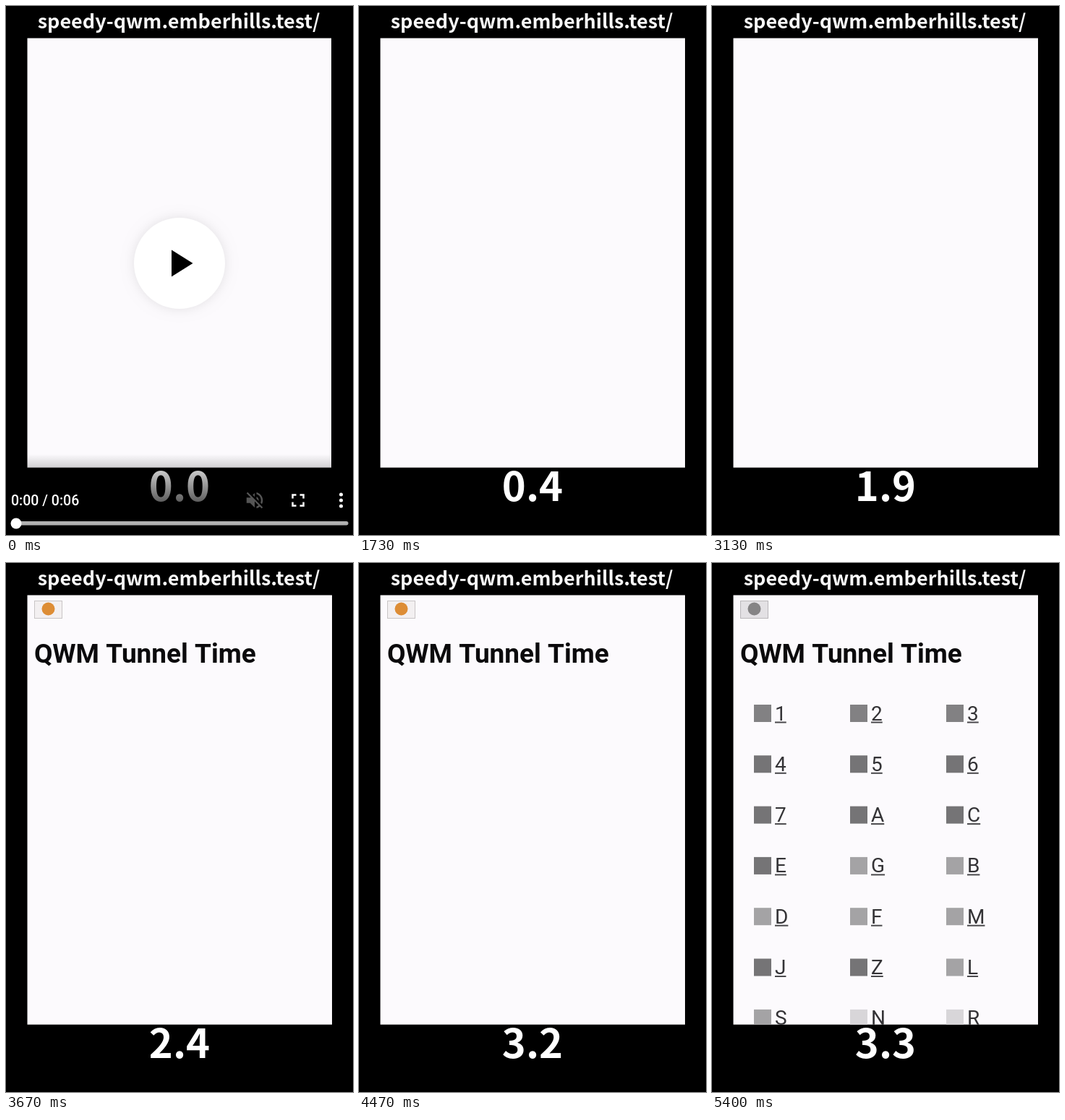
An HTML page with a canvas for the animation above (5.47 s loop, 480x732 px).

```html
<!DOCTYPE html>
<html lang="en">
<head>
<meta charset="utf-8">
<title>Page load timer</title>
<style>
  html, body { margin: 0; height: 100%; overflow: hidden; background: #000; }
  canvas { display: block; }
</style>
</head>
<body>
<canvas id="stage" width="480" height="732"></canvas>
<script>
const ctx = document.getElementById('stage').getContext('2d');
const LOOP = 5470, FPS = 15;
const PLAY = 1195, TITLE = 3395, LIST = 4525;
const CAPTION = '"Noto Sans CJK JP", "Noto Sans CJK SC", "Noto Sans CJK", "Noto Sans", sans-serif';
const UI = 'Roboto, sans-serif';
const LINES = '1234567ACEGBDFMJZLSNR';
const SHADES = { 123: '#828183', '4567ACEJZ': '#757476', GBDFMLS: '#a4a3a5', NR: '#d8d6d9' };
const PANEL = { x: 29.5, y: 44.5, w: 421.5, h: 594.2 };

const muteIcon = new Path2D('M16.5 12c0-1.77-1.02-3.29-2.5-4.03v2.21l2.45 2.45c.03-.2.05-.41.05-.63zm2.5 0c0 .94-.2 1.82-.54 2.64l1.51 1.51C20.63 14.91 21 13.5 21 12c0-4.28-2.99-7.86-7-8.77v2.06c2.89.86 5 3.54 5 6.71zM4.27 3L3 4.27 7.73 9H3v6h4l5 5v-6.73l4.25 4.25c-.67.52-1.42.93-2.25 1.18v2.06c1.38-.31 2.63-.95 3.69-1.81L19.73 21 21 19.73l-9-9zM12 4L9.91 6.09 12 8.18z');
const fullscreenIcon = new Path2D('M7 14H5v5h5v-2H7zM5 10h2V7h3V5H5zm12 7h-3v2h5v-5h-2zM14 5v2h3v3h2V5z');

function rect(x, y, w, h, color) {
  ctx.fillStyle = color;
  ctx.fillRect(x, y, w, h);
}

function disc(x, y, r, color) {
  ctx.fillStyle = color;
  ctx.beginPath();
  ctx.arc(x, y, r, 0, Math.PI * 2);
  ctx.fill();
}

function text(str, x, y, font, color, align = 'left') {
  ctx.font = font;
  ctx.fillStyle = color;
  ctx.textAlign = align;
  ctx.fillText(str, x, y);
}

function icon(path, cx, cy, color) {
  ctx.save();
  ctx.translate(cx - 15, cy - 15);
  ctx.scale(1.25, 1.25);
  ctx.fillStyle = color;
  ctx.fill(path);
  ctx.restore();
}

function drawControls() {
  const shade = ctx.createLinearGradient(0, 620, 0, 732);
  shade.addColorStop(0, 'rgba(0,0,0,0)');
  shade.addColorStop(0.17, 'rgba(0,0,0,.17)');
  shade.addColorStop(0.58, 'rgba(0,0,0,.62)');
  shade.addColorStop(1, 'rgba(0,0,0,.8)');
  rect(0, 620, 480, 112, shade);

  ctx.save();
  ctx.shadowColor = 'rgba(0,0,0,.1)';
  ctx.shadowBlur = 16;
  disc(240, 356, 63, '#fff');
  ctx.restore();
  ctx.fillStyle = '#000';
  ctx.fill(new Path2D('M229 337.5V374.500L258.500 356z'));

  text('0:00 / 0:06', 7, 690.5, `500 19.5px ${UI}`, '#fff');
  icon(muteIcon, 344, 684, '#555');
  icon(fullscreenIcon, 404, 684, '#fff');
  for (const y of [676, 684, 692]) disc(463.5, y, 2.5, '#fff');

  ctx.fillStyle = '#b0b0b0';
  ctx.beginPath();
  ctx.roundRect(8, 713, 465.5, 5.5, 2.75);
  ctx.fill();
  disc(14, 716, 7.5, '#fff');
}

function drawTitle(gray) {
  rect(39, 52, 39, 25, gray ? '#b9b7b9' : '#c9c5c6');
  rect(40, 53, 37, 23, gray ? '#e3e1e4' : '#f3f0f1');
  disc(58.5, 63.5, 9, gray ? '#858485' : '#dd8d35');
  text('QWM Tunnel Time', 39, 137.5, `bold 37px ${UI}`, '#0b0a0c');
}

function drawList() {
  ctx.save();
  ctx.beginPath();
  ctx.rect(PANEL.x, PANEL.y, PANEL.w, PANEL.h);
  ctx.clip();
  [...LINES].forEach((name, i) => {
    const x = 58 + (i % 3) * 133;
    const y = 208 + Math.floor(i / 3) * 70.3;
    const group = Object.keys(SHADES).find(names => names.includes(name));
    rect(x, y - 12, 24, 24, SHADES[group]);
    text(name, x + 29, y + 9.5, `28px ${UI}`, '#343336');
    rect(x + 29, y + 11.5, ctx.measureText(name).width, 2, '#4a494c');
  });
  ctx.restore();
}

function draw(t) {
  const playing = t >= PLAY;
  rect(0, 0, 480, 732, '#000');
  rect(PANEL.x, PANEL.y, PANEL.w - (playing ? 0 : 1), PANEL.h, '#fcfafd');
  text('speedy-qwm.emberhills.test/', 239, 30.5, `bold 27px ${CAPTION}`, '#f8f8f8', 'center');

  // The clip counts in video frames and stops once the list is there.
  const clock = Math.floor((t + 5) * FPS / 1000) / FPS;
  const seconds = Math.min(3.3, Math.max(0, (clock - 1.245) * 1.0235));
  const shown = (Math.floor(seconds * 10 + 1e-6) / 10).toFixed(1);
  text(shown, 240, 685, `bold 56px ${CAPTION}`, '#fff', 'center');

  if (!playing) drawControls();
  if (t >= TITLE) drawTitle(t >= LIST);
  if (t >= LIST) drawList();
}

const start = performance.now();
function tick() {
  draw((performance.now() - start) % LOOP);
  requestAnimationFrame(tick);
}
tick();
</script>
</body>
</html>
```
